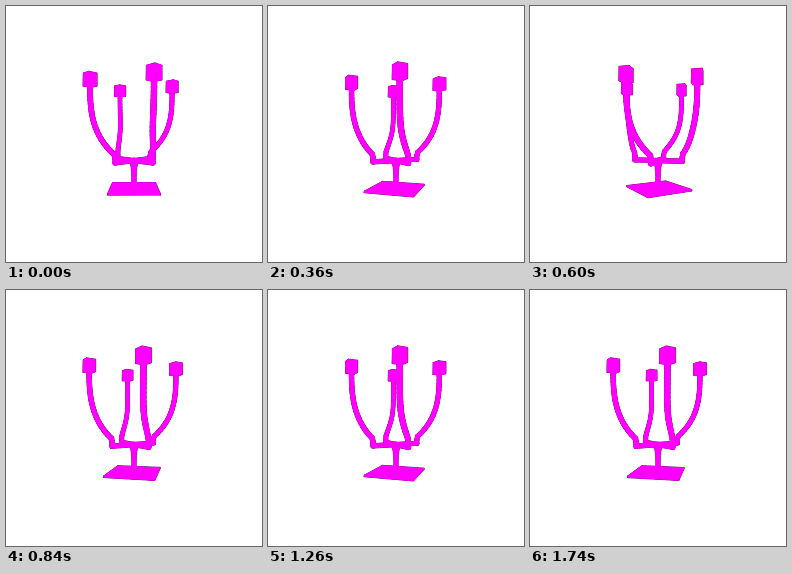
An HTML page with a canvas for the animation above (1800 ms loop, 256x256 px).

```html
<!DOCTYPE html>
<html lang="en">
<head>
<meta charset="utf-8">
<title>Turning candelabrum</title>
<style>
html, body { margin: 0; width: 100%; height: 100%; overflow: hidden; background: #fff; }
canvas { display: block; width: 256px; height: 256px; }
</style>
</head>
<body>
<canvas id="stage" width="256" height="256"></canvas>
<script>
const ctx = document.getElementById('stage').getContext('2d');
const CX = 128, HORIZON = 128, EYE = 230;
const STEP = 60, STEPS = 30;
const ARM_TOP = -46, HUB = 26.5, TABLE = 53.5;
const TOP_RADIUS = 44, ELBOW_RADIUS = 24.5, TWIST = 23;

const rad = d => d * Math.PI / 180;
const range = (n, f) => Array.from({ length: n }, (_, i) => f(i));
const polar = (r, deg, h) => [r * Math.sin(rad(deg)), h, r * Math.cos(rad(deg))];

// h counts downward from the horizon, z toward the viewer
function project([x, h, z]) {
  const k = EYE / (EYE - z);
  return { x: CX + x * k, y: HORIZON + h * k, k };
}

function face(points, grow) {
  ctx.beginPath();
  points.forEach(p => ctx.lineTo(p.x, p.y));
  ctx.closePath();
  ctx.fill();
  ctx.lineWidth = 0.1 + 2 * grow;
  ctx.stroke();
}

// Upright square prism; r is half the diagonal
function box([cx, , cz], r, turn, top, bottom, grow) {
  const ring = h => range(4, i => {
    const [x, , z] = polar(r, turn + 45 + 90 * i, h);
    return project([cx + x, h, cz + z]);
  });
  const a = ring(top), b = ring(bottom);
  face(a, grow);
  face(b, grow);
  a.forEach((p, i) => {
    const j = (i + 1) % 4;
    face([p, a[j], b[j], b[i]], grow);
  });
}

// The arm curves inward and twists as it nears the elbow, then runs to the hub
function arm(angle, grow) {
  const points = range(21, i => {
    const h = ARM_TOP + (HUB - ARM_TOP) * i / 20;
    const u = Math.min(1, (h - ARM_TOP) / 66);
    const r = ELBOW_RADIUS + (TOP_RADIUS - ELBOW_RADIUS) * (1 - u ** 2.8);
    return project(polar(r, angle + TWIST * u ** 5, h));
  });
  points.push(project([0, HUB, 0]));
  points.slice(1).forEach((b, i) => {
    const a = points[i];
    ctx.lineWidth = 4.9 * (a.k + b.k) / 2 + 2 * grow;
    ctx.beginPath();
    ctx.moveTo(a.x, a.y);
    ctx.lineTo(b.x, b.y);
    ctx.stroke();
  });
}

function stem(grow) {
  const side = sign => range(13, i => {
    const h = HUB + (TABLE - HUB) * i / 12;
    return project([sign * (2.3 + 3.7 * Math.exp((HUB - h) / 4)), h, 0]);
  });
  face([...side(-1), ...side(1).reverse()], grow);
}

function model(turn, color, grow) {
  ctx.fillStyle = ctx.strokeStyle = color;
  box([0, 0, 0], 33.5, turn, TABLE, TABLE + 1.3, grow);
  stem(grow);
  for (let i = 0; i < 4; i++) {
    const angle = turn + 22 + 90 * i;
    arm(angle, grow);
    box(polar(TOP_RADIUS, angle, 0), 6.4, turn + 45, -56.5, -44.5, grow);
  }
}

function draw() {
  const turn = Math.floor(performance.now() / STEP) % STEPS * 360 / STEPS;
  ctx.fillStyle = '#fff';
  ctx.fillRect(0, 0, 256, 256);
  model(turn, '#505', 0.2);
  model(turn, '#f0f', 0);
  requestAnimationFrame(draw);
}

ctx.lineCap = ctx.lineJoin = 'round';
draw();
</script>
</body>
</html>
```
